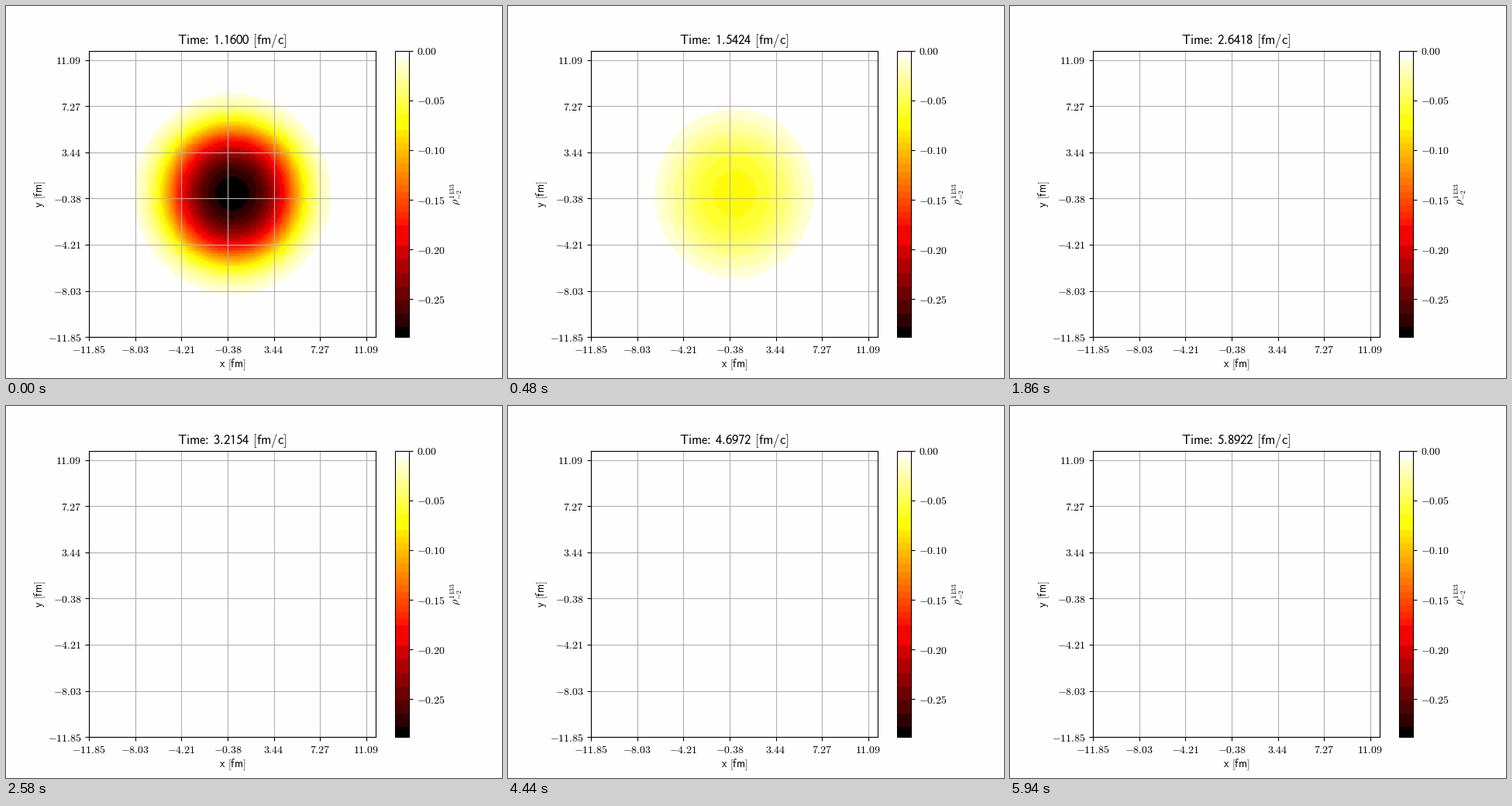
Write a matplotlib script that moves like this. It is 640x480 px and loops after 6000 ms.

```python
import numpy as np
import matplotlib.pyplot as plt
from matplotlib.animation import FuncAnimation
from matplotlib.colors import ListedColormap

FRAMES, INTERVAL = 100, 60
T0, DT = 1.16, 0.0478
HALF, DX = 62, 0.1912
EDGE = HALF * DX
CELLS = 2 * HALF + 1
DEPTH = 0.2881
PAPER = "#fefefe"
SPACE = r"\hspace{0.38}"
# Sans-serif digits, since the math font always sets plain ones with serifs.
SANS_DIGITS = {ord("0") + d: chr(0x1D7E2 + d) for d in range(10)}

plt.rcParams.update({
    "mathtext.fontset": "cm",
    "figure.facecolor": PAPER,
    "axes.facecolor": PAPER,
})


def sans(text):
    """Sans-serif math text with normal word spaces."""
    return r"\mathsf{%s}" % text.replace(" ", SPACE)


def number(value):
    sign = "{-}" if value < -0.004 else ""
    return f"${sign}{abs(value):.2f}$"


def time_label(t):
    digits = f"{t:.4f}".translate(SANS_DIGITS)
    return "$%s%s\\mathrm{%s}%s$" % (
        sans(r"Time\hspace{-0.2}:\hspace{-0.2}"), SPACE, digits, sans(" [fm/c]"))


def banded_hot():
    """The hot colormap, averaged over coarse RGB buckets."""
    rgb = plt.get_cmap("hot", 256)(np.arange(256), bytes=True)[:, :3].astype(int)
    keys = (rgb[:, 0] // 32) * 256 + (rgb[:, 1] // 16) * 8 + rgb[:, 2] // 32
    out = np.empty((256, 3))
    for key in np.unique(keys):
        out[keys == key] = rgb[keys == key].mean(axis=0)
    out[keys == keys[0]] = (3, 0, 0)
    out[keys == keys[-1]] = (254, 254, 254)
    return ListedColormap(out / 255)


offset = np.arange(-HALF, HALF + 1) * 369.6 / CELLS
X2, Y2 = np.meshgrid(offset**2, offset**2)


def field(t):
    """Decaying well that narrows faster along x than along y."""
    s = np.log(t / T0)
    peak = np.exp(-5.326 * s + 1.12 * s**2)
    qx, qy = (0.72 + 0.6 * s) * 1e-4, (0.70 + 0.1 * s) * 1e-4
    px, py = (9 + 47 * s**3) * 1e-9, 8.4e-9
    quartic = (np.sqrt(px) * X2 + np.sqrt(py) * Y2) ** 2
    return -DEPTH * peak * np.exp(-qx * X2 - qy * Y2 - quartic)


fig, ax = plt.subplots(figsize=(6.4, 4.8), dpi=100)
image = ax.imshow(field(T0), cmap=banded_hot(), vmin=-DEPTH, vmax=0,
                  origin="lower", extent=(-EDGE, EDGE, -EDGE, EDGE),
                  interpolation="nearest")
ticks = -EDGE + DX * np.arange(0, CELLS, 20)
labels = [number(v) for v in ticks]
ax.set_xticks(ticks, labels)
ax.set_yticks(ticks, labels)
ax.set_xlabel("$%s$" % sans("x [fm]"), labelpad=1.5)
ax.set_ylabel("$%s$" % sans("y [fm]"), labelpad=0.5)
ax.grid(True)
title = ax.set_title("")

bar = fig.colorbar(image, ax=ax)
levels = np.arange(-5, 1) * 0.05
bar.set_ticks(levels, labels=[number(v) for v in levels])
bar.set_label(r"$\rho_{-2}^{1133}$")


def update(i):
    t = T0 + DT * i
    image.set_data(field(t))
    title.set_text(time_label(t))
    return image, title


anim = FuncAnimation(fig, update, frames=FRAMES, interval=INTERVAL,
                     repeat=True, repeat_delay=0, blit=False)
plt.show()
```
